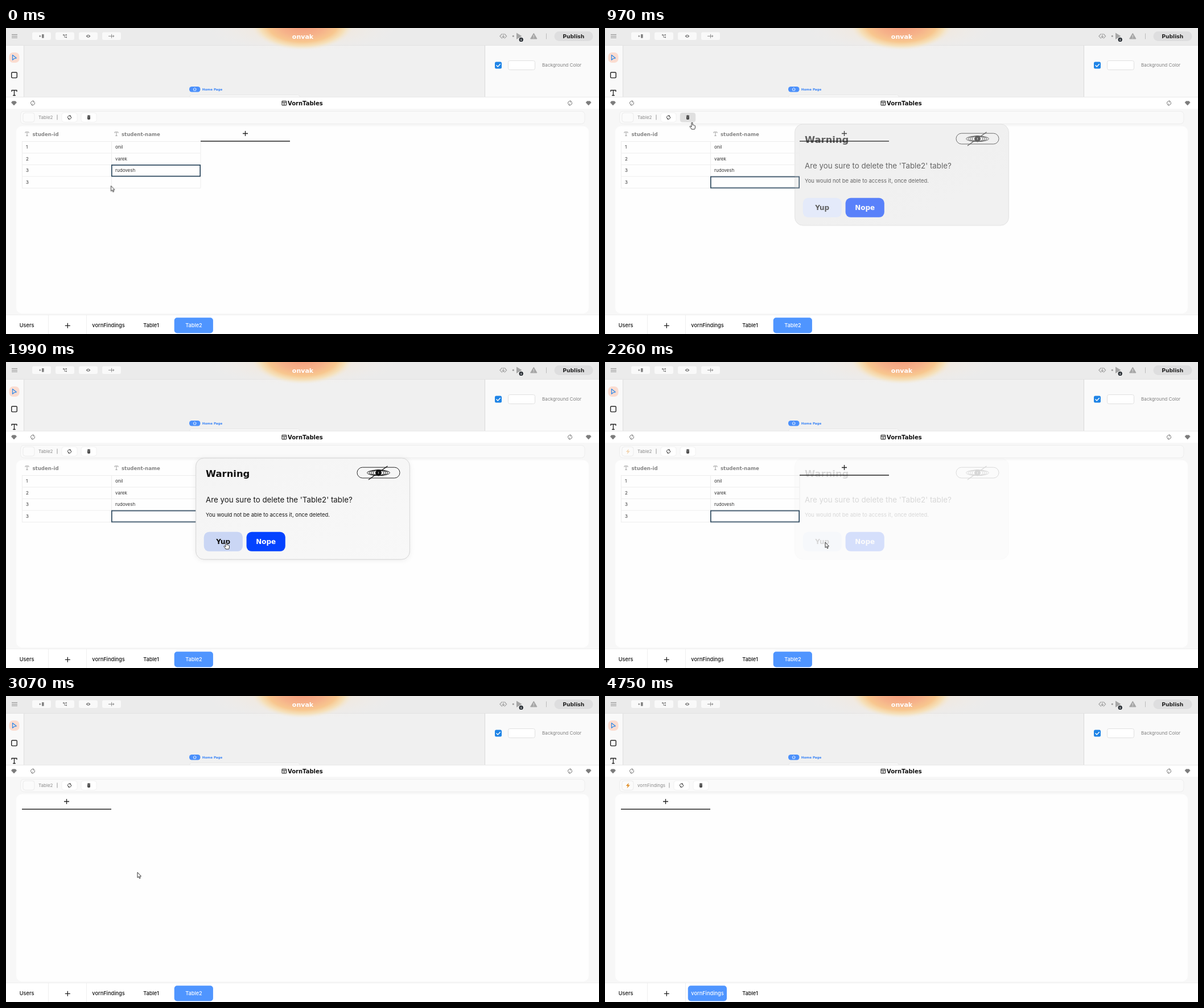
An HTML page for the animation above (5.15 s loop, 1042 by 538 pixels).

```html
<!DOCTYPE html>
<html lang="en">
<head>
<meta charset="utf-8">
<title>Delete a table</title>
<style>
html, body { margin: 0; width: 100%; height: 100%; overflow: hidden; background: #f8f8f8; }
svg { display: block; }
text { font-family: Inter, Roboto, sans-serif; }
.wide { font-family: "DejaVu Sans", sans-serif; font-weight: 700; }
.cell { font-size: 8px; fill: #333; }
.name { font-size: 8px; fill: #8a8a8a; }
.tab { font-size: 9.2px; font-weight: 500; text-anchor: middle; fill: #111; }
.head { font-size: 8.6px; fill: #858585; }
.line { fill: none; stroke-linecap: round; stroke-linejoin: round; }

/* One shared 5150 ms clock; percentages are ms / 51.5 */
.anim { animation: 5150ms step-end infinite; }
#cursor { animation-name: travel; }
#arrow { animation-name: arrow; }
#hand { animation-name: hand; }
#trashHover { animation-name: trash; }
#yupHover { animation-name: yup; }
#veil { animation-name: veil; }
#sheet { animation-name: sheet; filter: drop-shadow(0 1px 4px rgba(0, 0, 0, .07)); }
#message { animation-name: message; }
#selection { animation-name: selection; }
#rows { animation-name: rows; }
#add { animation-name: add; }
#bolt { animation-name: bolt; }
#tools { animation-name: tools; }
.old { animation-name: old; }
.new { animation-name: new; }

@keyframes travel {
  0%, 1.553% { transform: translate(184.5px, 277.5px); }
  1.553% { animation-timing-function: steps(4, start); }
  6.796% { transform: translate(153px, 167.5px); animation-timing-function: steps(3, start); }
  10.874%, 20.194% { transform: translate(153px, 166px); }
  20.194% { animation-timing-function: steps(5, start); }
  26.796% { transform: translate(380px, 360px); animation-timing-function: steps(2, start); }
  29.515%, 30.68% { transform: translate(424px, 348px); }
  30.68% { animation-timing-function: steps(4, start); }
  36.117%, 41.165% { transform: translate(387px, 317px); }
  41.165% { animation-timing-function: steps(6, start); }
  48.932% { transform: translate(293px, 354px); animation-timing-function: steps(3, start); }
  53.01% { transform: translate(240px, 329px); animation-timing-function: steps(5, start); }
  59.612%, 76.505% { transform: translate(231px, 310px); }
  76.505% { animation-timing-function: steps(6, start); }
  85.437% { transform: translate(496px, 448px); animation-timing-function: steps(5, start); }
  92.233%, 100% { transform: translate(997px, 528px); }
}
@keyframes arrow {
  0%, 20.194%, 42.524% { opacity: 1; }
  6.796%, 33.398%, 92.233%, 100% { opacity: 0; }
}
@keyframes hand {
  0%, 20.194%, 42.524%, 100% { opacity: 0; }
  6.796%, 33.398% { opacity: 1; }
}
@keyframes trash { 0%, 20.194%, 100% { opacity: 0; } 6.796% { opacity: 1; } }
@keyframes yup { 0%, 42.524%, 100% { opacity: 0; } 33.398% { opacity: 1; } }
@keyframes veil {
  0%, 45.049%, 100% { opacity: 0; }
  18.835% { opacity: 1; }
  42.524% { opacity: .5; }
  43.883% { opacity: .2; }
}
@keyframes sheet {
  0%, 43.883%, 100% { opacity: 0; }
  18.835% { opacity: .15; }
  20.194% { opacity: .7; }
  21.553% { opacity: 1; }
  41.165% { opacity: .5; }
  42.524% { opacity: .1; }
}
@keyframes message {
  0%, 45.049%, 100% { opacity: 0; }
  18.835% { opacity: .64; }
  20.194% { opacity: .86; }
  21.553% { opacity: 1; }
  41.165% { opacity: .7; }
  42.524% { opacity: .4; }
  43.883% { opacity: .15; }
}
@keyframes selection {
  0% { transform: none; }
  18.835%, 100% { transform: translateY(20.5px); }
}
@keyframes rows { 0% { opacity: 1; } 59.612%, 100% { opacity: 0; } }
@keyframes add { 0% { transform: none; } 59.612%, 100% { transform: translateX(-314px); } }
@keyframes bolt {
  0%, 59.612% { opacity: 0; }
  43.883% { opacity: .35; }
  46.408% { opacity: .7; }
  48.932%, 79.223%, 100% { opacity: 1; }
}
@keyframes tools { 0% { transform: none; } 79.223%, 100% { transform: translateX(23px); } }
@keyframes old { 0% { opacity: 1; } 79.223%, 100% { opacity: 0; } }
@keyframes new { 0% { opacity: 0; } 79.223%, 100% { opacity: 1; } }
</style>
</head>
<body>
<svg width="1042" height="538" viewBox="0 0 1042 538">
  <defs>
    <radialGradient id="glow">
      <stop offset="0" stop-color="#f39a7c"/>
      <stop offset=".45" stop-color="#f6b28a"/>
      <stop offset=".68" stop-color="#f8c78f"/>
      <stop offset=".84" stop-color="#f7deb0" stop-opacity=".8"/>
      <stop offset="1" stop-color="#f3ead9" stop-opacity="0"/>
    </radialGradient>
    <radialGradient id="haze">
      <stop offset=".3" stop-color="#f8e3cc" stop-opacity=".6"/>
      <stop offset="1" stop-color="#f3efec" stop-opacity="0"/>
    </radialGradient>
    <linearGradient id="paper" x1="0" y1="0" x2="1" y2="1">
      <stop offset="0" stop-color="#f4f4f4"/>
      <stop offset="1" stop-color="#f8f8f8"/>
    </linearGradient>
    <g id="sync" class="line">
      <path d="M-3.4 1.2A3.6 3.6 0 0 1 2.2-2.8M3.4-1.2A3.6 3.6 0 0 1-2.2 2.8"/>
      <path d="M.8-4.2 2.4-2.7.8-1.2M-.8 4.2-2.4 2.7-.8 1.2"/>
    </g>
    <path id="gem" d="M-2.6-3.3h5.2l2 2.4L0 4-4.6-.9z" fill="#7c7c7c" stroke="#7c7c7c" stroke-width=".6" stroke-linejoin="round"/>
    <path id="plus" d="M-4.5 0h9M0-4.5v9" stroke="#222" stroke-width="1.3"/>
    <path id="tee" d="M-3-1.8v-1.5h6v1.5M0-3.3v6.6M-1.3 3.3h2.6" class="line" stroke="#999" stroke-width=".9"/>
  </defs>

  <!-- Editor behind the panel -->
  <rect width="1042" height="122" fill="#f0f0f0"/>
  <rect y="30" width="31" height="92" fill="#f9f9f9"/>
  <path d="M31.5 30v92" stroke="#dedede"/>
  <rect x="841" y="30" width="201" height="92" fill="#fafafa"/>
  <path d="M841.5 30v92" stroke="#dadada"/>
  <rect width="1042" height="30" fill="#ebebeb"/>
  <path d="M0 30.5h1042" stroke="#e2e2e2"/>
  <ellipse cx="521" cy="0" rx="170" ry="43" fill="url(#haze)"/>
  <ellipse cx="521" cy="-6" rx="90" ry="45" fill="url(#glow)"/>
  <text class="wide" x="521.5" y="18.5" font-size="11" fill="#fff" text-anchor="middle">onvak</text>

  <path d="M10 11.5h10M10 14.3h10M10 17.1h10" stroke="#8b8b8b" stroke-width="1"/>
  <g fill="#f9f9f9">
    <rect x="46" y="7.5" width="33" height="13.5" rx="3"/>
    <rect x="87" y="7.5" width="33" height="13.5" rx="3"/>
    <rect x="128" y="7.5" width="33" height="13.5" rx="3"/>
    <rect x="169" y="7.5" width="33" height="13.5" rx="3"/>
  </g>
  <g fill="#808080" stroke="#808080" stroke-width=".9">
    <path d="M58 14.3h3.6M59.8 12.5v3.6" fill="none"/>
    <rect x="63.5" y="11.5" width="2.6" height="5.6"/>
    <path d="M101.5 12.3h4M102.8 12.3v4h2.7" fill="none"/>
    <path d="M100 11.3h2v2h-2zM105 11.3h2v2h-2zM105 15.3h2v2h-2z" stroke="none"/>
    <path d="M140.5 14.3q4-5 8 0q-4 5-8 0z" stroke="none"/>
    <path d="M180 14.3h10M185.6 10.8v7M188 12.5l2 1.8-2 1.8" fill="none"/>
  </g>
  <circle cx="144.5" cy="14.3" r="1.2" fill="#f9f9f9"/>
  <path class="line" d="M871.5 10.5 867.8 14.3l3.7 3.8M876 10.5l3.7 3.8-3.7 3.8M873.8 10v7M872 15.2l1.8 1.8 1.8-1.8" stroke="#a2a2a2" stroke-width="1.2"/>
  <circle cx="891.3" cy="14.3" r="1.5" fill="#9c9c9c"/>
  <path d="M897 8.5v11.5l9.5-5.8z" fill="#a6a6a6"/>
  <circle cx="905.2" cy="20.4" r="3.6" fill="#20262c"/>
  <path d="M905.2 18.6v3.4M903.8 20.8l1.4 1.4 1.4-1.4" class="line" stroke="#fff" stroke-width=".7"/>
  <path d="M927.3 9.3 933 19h-11.4z" fill="#a6a6a6" stroke="#a6a6a6" stroke-linejoin="round"/>
  <path d="M927.3 12.5v3.2M927.3 16.8v1.1" stroke="#eee"/>
  <path d="M949.5 9.5v10" stroke="#bbb"/>
  <rect x="963.5" y="6" width="68" height="17" rx="8.5" fill="#dededf"/>
  <text class="wide" x="997.3" y="18" font-size="9.2" text-anchor="middle" fill="#222">Publish</text>

  <rect x="5.5" y="43" width="18" height="18" rx="7" fill="#fbdcd0"/>
  <path class="line" d="M11.5 47.5v8.7l2.5-2.2 4.2-1.2z" stroke="#2c87e8" stroke-width="1.2"/>
  <rect x="9.7" y="78" width="9.6" height="9.6" rx="1.5" fill="none" stroke="#222" stroke-width="1.4"/>
  <path class="line" d="M10 111.5v-2h9v2M14.5 109.5v9M12.7 118.5h3.6" stroke="#222" stroke-width="1.3"/>

  <rect x="322" y="103" width="19.5" height="9.5" rx="4.5" fill="#4b90fb"/>
  <path class="line" d="M329 107.3l2.7-2.2 2.7 2.2M329.8 107.3v2.7h3.8v-2.7" stroke="#fff" stroke-width=".8"/>
  <text class="wide" x="344.8" y="109.9" font-size="5.6" fill="#3d86f6">Home Page</text>
  <rect x="322.5" y="117.5" width="194" height="10" rx="4" fill="#f7f7f7" stroke="#e8e8e8"/>

  <rect x="859" y="59.5" width="12" height="12" rx="2.5" fill="#1f84e6"/>
  <path class="line" d="M862 65.7l2.2 2.2 4.2-4.5" stroke="#fff" stroke-width="1.4"/>
  <rect x="882.5" y="57.5" width="47" height="16" rx="3" fill="#fff" stroke="#e0e0e0"/>
  <text x="942" y="68.3" font-size="8.15" fill="#808080">Background Color</text>

  <!-- Panel -->
  <path d="M0 121.5h1042" stroke="#e9e9e9"/>
  <rect y="142" width="1042" height="396" fill="#f7f7f7"/>
  <rect y="122" width="1042" height="20" fill="#fff"/>
  <use href="#gem" x="14" y="132"/>
  <use href="#gem" x="1023.6" y="132"/>
  <use href="#sync" x="47" y="132" stroke="#777"/>
  <use href="#sync" x="991" y="132" stroke="#777"/>
  <path d="M485 128.5h7.5v7.3H485zM485 131h7.5M488.7 131v4.8" fill="none" stroke="#111" stroke-width="1"/>
  <text class="wide" x="495" y="135.8" font-size="10" fill="#111">VornTables</text>

  <rect x="25.5" y="146.5" width="991.5" height="22" rx="6" fill="#fafafa" stroke="#ededed"/>
  <rect x="30" y="149" width="20" height="16.5" rx="4" fill="#fbfbfb" stroke="#ebebeb"/>
  <path id="bolt" class="anim" d="M41.8 152.8 36.8 158h3l-1.2 4.2 5.4-5.8h-3.1z" fill="#e2902b"/>
  <text class="name anim old" x="57" y="159.9">Table2</text>
  <text class="name anim new" x="57" y="159.9">vornFindings</text>
  <g id="tools" class="anim">
    <path d="M90 152.5v9" stroke="#999"/>
    <rect x="98" y="149" width="27" height="16.5" rx="4" fill="#fff" stroke="#eee" stroke-width=".8"/>
    <rect x="132" y="149" width="27" height="16.5" rx="4" fill="#fff" stroke="#eee" stroke-width=".8"/>
    <rect id="trashHover" class="anim" x="132" y="149" width="27" height="16.5" rx="4" fill="#e0e0e0"/>
    <use href="#sync" transform="translate(111.5 157.2) scale(.88)" stroke="#222" stroke-width="1"/>
    <path d="M142.8 154.4h5.4M144.6 153.7h1.8" stroke="#222" stroke-width=".9"/>
    <path d="M143.2 155.5h4.6v4.3q0 .9-.9.9h-2.8q-.9 0-.9-.9z" fill="#222"/>
    <path d="M144.6 157l1.8 2M146.4 157l-1.8 2" stroke="#fff" stroke-width=".6"/>
  </g>

  <rect x="18" y="172.5" width="1006" height="329.5" rx="10" fill="#fefefe"/>
  <rect id="veil" class="anim" x="333.7" y="169" width="375.6" height="178" rx="14" fill="#f0f0f0" stroke="#e4e4e4"/>
  <g id="rows" class="anim">
    <path d="M28 199.5h314M28 220h314M28 240.5h314M28 261h314M28 281.5h314M28.5 199v82M185.5 199v82M342 199v82" stroke="#ededed" fill="none"/>
    <use href="#tee" x="37" y="186.2"/>
    <use href="#tee" x="194" y="186.2"/>
    <text class="wide head" x="46.5" y="189.6">studen-id</text>
    <text class="wide head" x="203" y="189.6">student-name</text>
    <text class="cell" x="35" y="212.4">1</text>
    <text class="cell" x="35" y="232.9">2</text>
    <text class="cell" x="35" y="253.4">3</text>
    <text class="cell" x="35" y="273.9">3</text>
    <text class="cell" x="192" y="212.4">onil</text>
    <text class="cell" x="192" y="232.9">varek</text>
    <text class="cell" x="192" y="253.4">rudovesh</text>
    <rect id="selection" class="anim" x="185.8" y="241" width="155.4" height="19.6" fill="#fff" fill-opacity="0" stroke="#213e55" stroke-width="1.6"/>
  </g>
  <g id="add" class="anim">
    <use href="#plus" x="420.5" y="185.5"/>
    <path d="M342 199h157" stroke="#222" stroke-width="1.6"/>
  </g>

  <!-- Tabs -->
  <rect y="505" width="1042" height="33" fill="#fff"/>
  <path d="M0 504.5h1042M74.5 505v33M141.5 505v33" stroke="#efefef"/>
  <use href="#plus" x="108.3" y="523.3"/>
  <rect class="anim old" x="295.7" y="509.2" width="68.2" height="27.3" rx="5" fill="#4f95ff"/>
  <rect class="anim new" x="145.8" y="509.2" width="68.2" height="27.3" rx="5" fill="#4f95ff"/>
  <text class="tab" x="36.6" y="526">Users</text>
  <text class="tab anim old" x="180" y="526">vornFindings</text>
  <text class="tab anim new" x="180" y="526" style="fill:#fff">vornFindings</text>
  <text class="tab" x="255" y="526">Table1</text>
  <text class="tab anim old" x="330" y="526" style="fill:#fff">Table2</text>

  <!-- Warning -->
  <rect id="sheet" class="anim" x="333.7" y="169" width="375.6" height="178" rx="14" fill="url(#paper)" stroke="#d6d6d6" stroke-width=".9"/>
  <g id="message" class="anim">
    <text class="wide" x="351" y="201.5" font-size="16.4" fill="#111">Warning</text>
    <text x="351" y="247.2" font-size="13.32" fill="#181818">Are you sure to delete the 'Table2' table?</text>
    <text x="351" y="272.3" font-size="9.42" fill="#181818">You would not be able to access it, once deleted.</text>
    <g fill="none" stroke="#111" stroke-width=".9">
      <rect x="617" y="185.2" width="75" height="18.8" rx="9.4"/>
      <ellipse cx="654.5" cy="194.8" rx="20" ry="4.8"/>
      <ellipse cx="654.5" cy="194.8" rx="16.5" ry="4.8"/>
      <ellipse cx="654.5" cy="194.8" rx="13" ry="4.8"/>
      <ellipse cx="654.5" cy="194.8" rx="9.5" ry="4.8"/>
      <circle cx="654.5" cy="194.8" r="5" fill="#111"/>
      <path d="M637 207 670.5 183" stroke-width="1.2"/>
      <path d="M654.5 193.2v3.2" stroke="#ddd"/>
    </g>
    <rect x="347.8" y="298.8" width="68" height="34" rx="9" fill="#dde7ff"/>
    <rect id="yupHover" class="anim" x="347.8" y="298.8" width="68" height="34" rx="9" fill="#cad6f4"/>
    <rect x="422.6" y="298.8" width="68.2" height="34" rx="9" fill="#0443ff"/>
    <text class="wide" x="381.7" y="319.8" font-size="12" text-anchor="middle" fill="#111">Yup</text>
    <text class="wide" x="456.7" y="319.8" font-size="12" text-anchor="middle" fill="#fff">Nope</text>
  </g>

  <!-- Pointer -->
  <g id="cursor" class="anim" fill="#fff" stroke="#222" stroke-width=".9" stroke-linejoin="round">
    <path id="arrow" class="anim" d="M0 0v9.4l2.1-1.9 1.5 3.3 1.5-.7-1.4-3.1h2.8z"/>
    <path id="hand" class="anim" d="M-1 .8q1-1.5 2 0V4.6q1.1-.7 1.7.3 1-.5 1.5.5 1.2-.3 1.2 1V9q0 1.7-1 3H-.8Q-1.6 10.2-4.1 7.3q.4-1.6 1.9-.5l1.2 1.2z"/>
  </g>
</svg>
</body>
</html>
```
